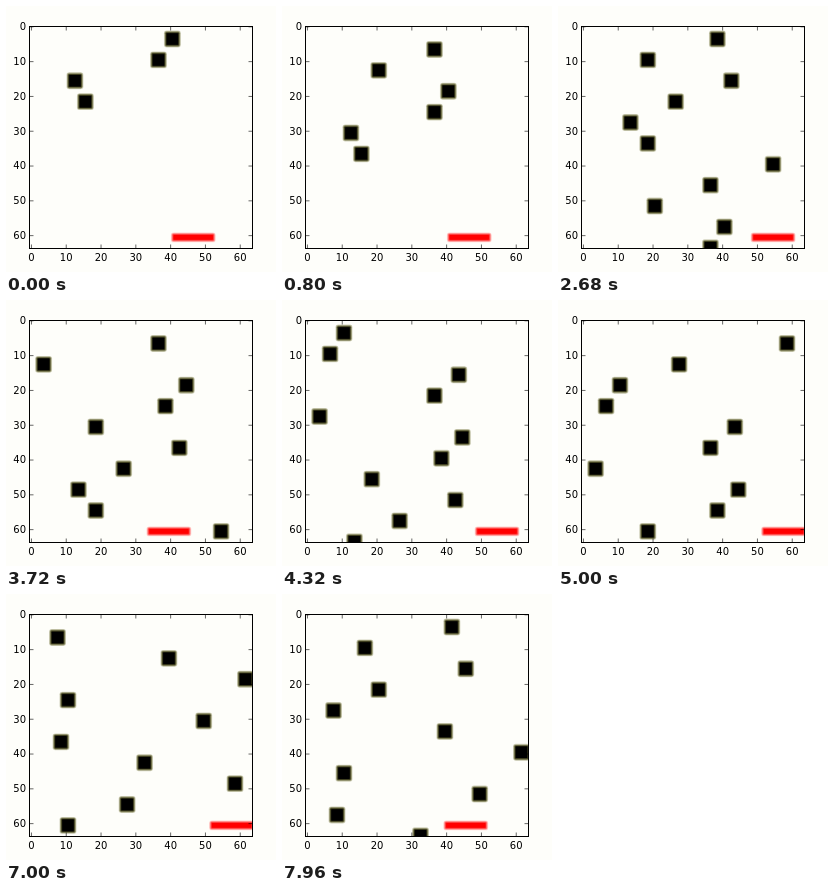
Write an HTML page that moves like this. It is 270 px wide and 266 px high and loops after 8000 ms.

```html
<!DOCTYPE html>
<html lang="en">
<head>
<meta charset="utf-8">
<title>Falling blocks</title>
<style>
  html, body { margin: 0; width: 100%; height: 100%; overflow: hidden; background: #fefefa; }
  svg { display: block; width: 100%; height: 100%; }
  text { font: 10px "DejaVu Sans", sans-serif; fill: #000; }
  .line { fill: none; stroke: #000; stroke-width: 1; }
  .tick { stroke: #000; stroke-width: .6; }
</style>
</head>
<body>
<svg viewBox="0 0 270 266">
  <clipPath id="area"><rect x="23.5" y="20.5" width="223" height="222"/></clipPath>
  <g id="play" clip-path="url(#area)"></g>
  <rect class="line" x="23.5" y="20.5" width="223" height="222"/>
  <g id="axes"></g>
</svg>
<script>
const LOOP = 8000, STEP = 142.1, CELL = 3.48, LEFT = 23.7, TOP = 19.1;
const FALL = 3, GAP = 6, SPEED = 3;
const px = c => LEFT + c * CELL;
const py = r => TOP + r * CELL;

// left column of each block, in order of appearance
const columns = [14, 11, 35, 39, 19, 35, 53, 17, 12, 25, 41, 17, 37, 43, 2, 35,
  42, 5, 9, 26, 57, 31, 7, 48, 9, 60, 38, 6, 19, 44, 15, 40];

// step at which the paddle sets off: column it heads for
const goals = { 10: 52, 17: 49, 20: 34, 25: 52, 49: 40 };
const path = [41];
for (let s = 0, goal = 41; s < 60; s++) {
  goal = goals[s] ?? goal;
  path.push(path[s] + Math.max(-SPEED, Math.min(SPEED, goal - path[s])));
}

const play = document.getElementById('play');
const axes = document.getElementById('axes');

function add(parent, tag, attrs, text) {
  const el = document.createElementNS('http://www.w3.org/2000/svg', tag);
  for (const k in attrs) el.setAttribute(k, attrs[k]);
  if (text !== undefined) el.textContent = text;
  return parent.appendChild(el);
}

// box whose edge fades over a few pixels; shade(0) is outside, shade(1) inside
function softBox(cols, rows, shade) {
  const g = add(play, 'g', {}), layers = 6;
  for (let i = 1; i <= layers; i++) {
    const d = 1.5 - 2.7 * (i - 1) / (layers - 1);
    add(g, 'rect', {
      x: -d, y: -d, width: cols * CELL + 2 * d, height: rows * CELL + 2 * d,
      rx: Math.max(.6, 1.2 + d), fill: shade(i / layers)
    });
  }
  return g;
}

const olive = k => `rgb(${254 * (1 - k)} ${254 * (1 - k)} ${250 * (1 - k) ** 1.5})`;
const red = k => `rgb(255 ${254 * (1 - k)} ${250 * (1 - k)})`;

function place(el, col, row) {
  el.setAttribute('transform', `translate(${px(col)} ${py(row)})`);
}

function tick(x, y, dx, dy) {
  add(axes, 'line', { class: 'tick', x1: x, y1: y, x2: x + dx, y2: y + dy });
}

for (let n = 0; n <= 60; n += 10) {
  const x = px(n + .5), y = py(n + .5);
  tick(x, 242.5, 0, -4);
  tick(x, 20.5, 0, 4);
  tick(23.5, y, 4, 0);
  tick(246.5, y, -4, 0);
  add(axes, 'text', { x, y: 255, 'text-anchor': 'middle' }, n);
  add(axes, 'text', { x: 20, y: y + 3.4, 'text-anchor': 'end' }, n);
}

const blocks = columns.map(() => softBox(4, 4, olive));
const paddle = softBox(12, 2, red);

function draw(now) {
  const t = now % LOOP;
  // the tempo lags a little at first and catches up later
  const step = Math.floor(t / STEP - .95 * Math.sin(2 * Math.PI * t / LOOP));
  const s = Math.max(0, step);
  blocks.forEach((el, i) => {
    const row = 20 - GAP * i + FALL * s;
    el.style.display = row >= 2 && row < 64 ? '' : 'none';
    place(el, columns[i], row);
  });
  place(paddle, path[s], 60);
}

const start = performance.now();
function loop() {
  draw(performance.now() - start);
  requestAnimationFrame(loop);
}
loop();
</script>
</body>
</html>
```
